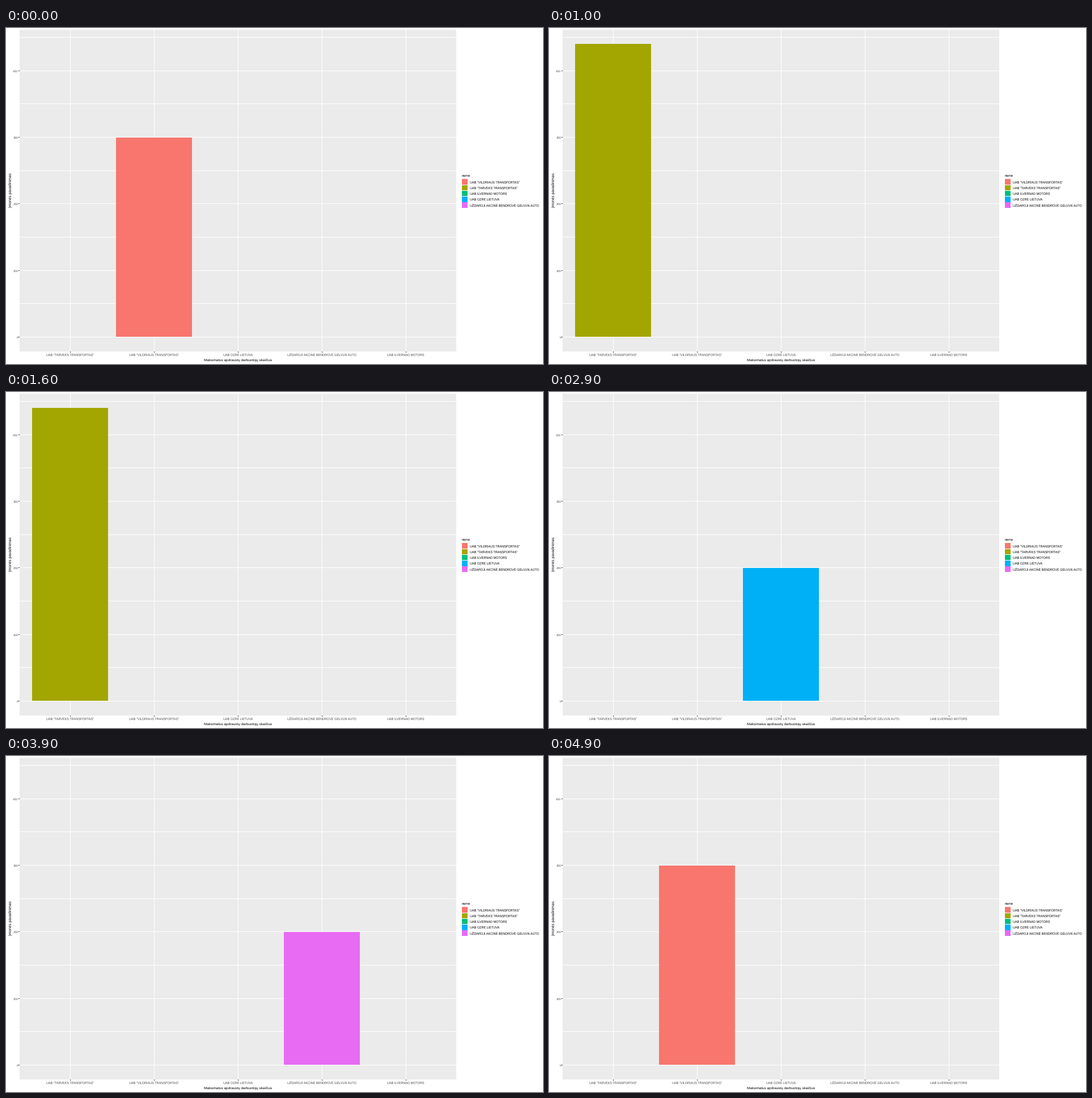
Write a matplotlib script that moves like this. It is 947x592 px and loops after 5000 ms.

```python
import numpy as np
import matplotlib.pyplot as plt
from matplotlib.animation import FuncAnimation
from matplotlib.patches import Rectangle

W, H, DPI = 947, 592, 100
plt.rcParams["font.family"] = "Liberation Sans"
plt.rcParams["text.hinting"] = "none"

# Legend order: name, colour, value, slot on the x axis
COMPANIES = [
    ('UAB "VILDRIAUS TRANSPORTAS"', "#F8766D", 299, 1),
    ('UAB "TARVEKS TRANSPORTAS"', "#A3A500", 440, 0),
    ("UAB ILVERNAD MOTORS", "#00BF7D", 180, 4),
    ("UAB OZRE LIETUVA", "#00B0F6", 199, 2),
    ("UŽDAROJI AKCINĖ BENDROVĖ GELVUN AUTO", "#E76BF3", 199, 3),
]
STARTS = [0, 10, 20, 29, 39, 49]  # tenths of a second
LEFT, TOP, RIGHT, BOTTOM = 24, 3, 794, 570
BAR_WIDTH = 133.2

fig = plt.figure(figsize=(W / DPI, H / DPI), dpi=DPI, facecolor="white")
ax = fig.add_axes([0, 0, 1, 1])
ax.set_xlim(0, W)
ax.set_ylim(H, 0)
ax.axis("off")


def x_pos(slot):
    return 113 + 148 * slot


def y_pos(value):
    return 544.5 - 1.1735 * value


def box(x, y, w, h, color):
    return ax.add_patch(Rectangle((x, y), w, h, fc=color, lw=0, snap=True))


def label(x, y, text, px, color="black", ha="left", rotation=0):
    ax.text(x, y, text, fontsize=px * 72 / DPI, color=color, ha=ha,
            va="baseline", rotation=rotation, rotation_mode="anchor")


def draw_panel():
    box(LEFT, TOP, RIGHT - LEFT, BOTTOM - TOP, "#EBEBEB")
    for value in range(0, 451, 50):
        y = int(y_pos(value))
        box(LEFT, y, RIGHT - LEFT, 1, "white")
        if value % 100 == 0:
            box(LEFT - 2, y, 2, 1, "#333333")
            label(21.5, y + 2.5, str(value), 5.5, "#4D4D4D", "right")
    for name, _, _, slot in COMPANIES:
        x = x_pos(slot)
        box(x, TOP, 1, BOTTOM - TOP, "white")
        box(x, BOTTOM, 1, 2, "#333333")
        label(x, 578, name, 5.53, "#4D4D4D", "center")
    label(409, 586.8, "Maksimalus apdraustų darbuotojų skaičius", 6.4, ha="center")
    label(9.2, 285.8, "Įmonės pavadinimas", 6.6, ha="center", rotation=90)


def draw_legend():
    label(804, 262, "name", 6.2)
    for row, (name, color, _, _) in enumerate(COMPANIES):
        y = 266.2 + 10.3 * row
        ax.add_patch(Rectangle((804, y), 9.6, 9.6, fc=color, lw=0))
        label(817.6, y + 7.3, name, 5.53)


draw_panel()
draw_legend()
bar = box(0, 0, BAR_WIDTH, 0, "white")


def update(frame):
    step = np.searchsorted(STARTS, frame, side="right") - 1
    _, color, value, slot = COMPANIES[step % len(COMPANIES)]
    top = int(y_pos(value))
    bar.set_bounds(x_pos(slot) - BAR_WIDTH / 2, top, BAR_WIDTH, 544 - top)
    bar.set_facecolor(color)
    return (bar,)


anim = FuncAnimation(fig, update, frames=50, interval=100, repeat=True,
                     repeat_delay=0)
plt.show()
```
